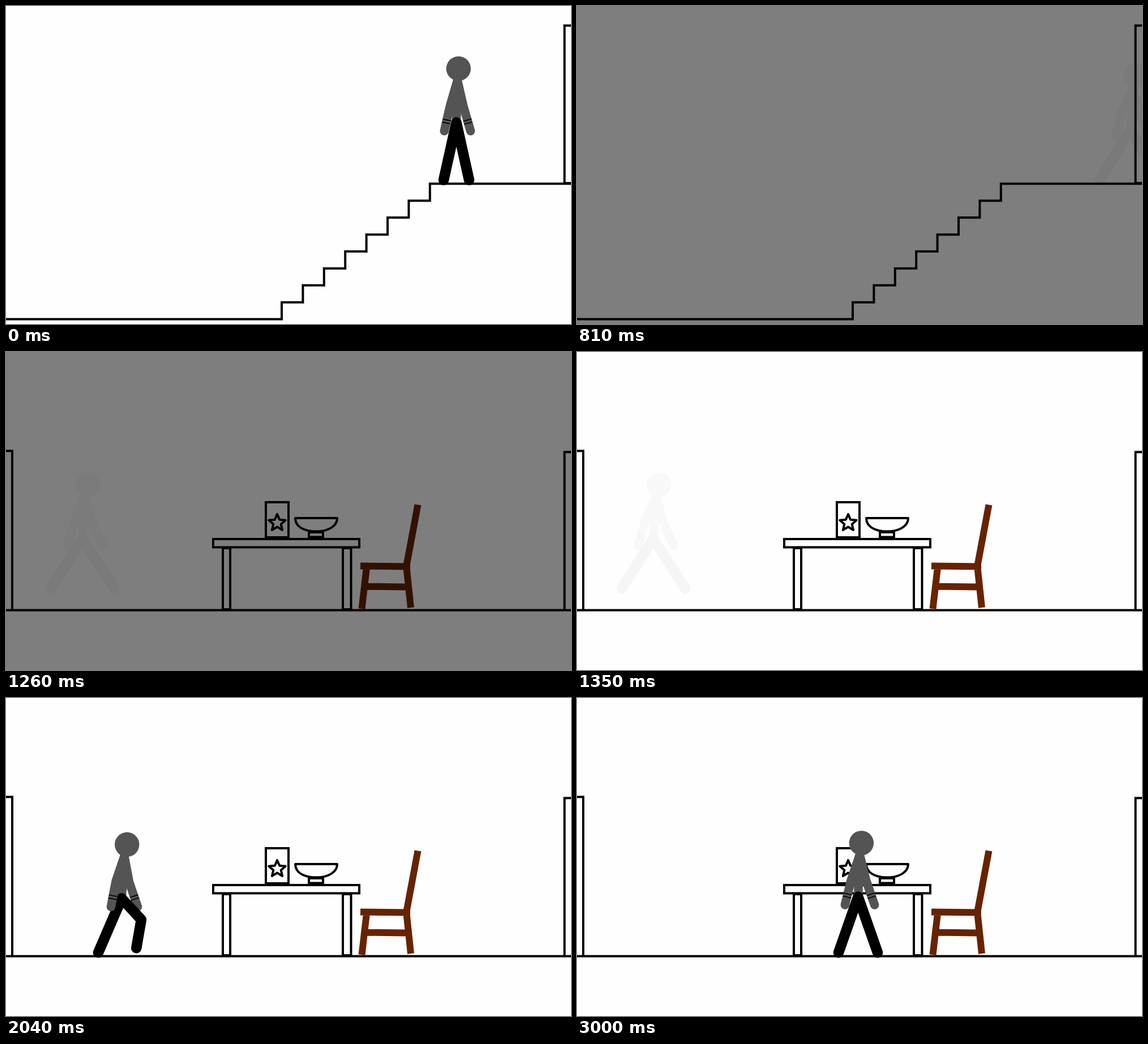
Recreate the animation shown at these times as an HTML page. Size 998 px wide and 561 px high, loop 3600 ms.

```html
<!DOCTYPE html>
<html lang="en">
<head>
<meta charset="utf-8">
<title>Walk home</title>
<style>
html, body { margin: 0; width: 100%; height: 100%; overflow: hidden; background: #fefefe; }
svg { display: block; width: 100%; height: 100%; }
path { fill: none; }
.ink { stroke: #000; stroke-width: 4; }
.solid path { fill: #fefefe; }
.chair { stroke: #672300; stroke-width: 12; }
.skin, .legs { stroke: #545454; stroke-width: 15.5; stroke-linecap: round; stroke-linejoin: round; }
.legs { stroke: #000; stroke-width: 18.5; }
.band { stroke: #000; stroke-width: 1.7; }
</style>
</head>
<body>
<svg viewBox="0 0 998 561">
  <rect width="998" height="561" fill="#fefefe"/>
  <g id="stairs" class="ink">
    <path id="steps"/>
    <path d="M1002 34.5H986.5V312.5H1002"/>
  </g>
  <g id="room">
    <g class="ink solid">
      <path d="M0 455.5H998M-4 174.5H11V455M1002 176.5H986.5V455"/>
      <path d="M383 346H396V454H383ZM595 346H609.5V454H595Z"/>
      <path d="M366 330H624V344.5H366Z"/>
      <path d="M459 265H499V327H459Z"/>
      <path id="star" stroke-linejoin="round"/>
      <path d="M535 318H560V326.5H535Z"/>
      <path stroke-linejoin="round" d="M511 293H585C585 308 568 316.5 548 316.5C526 316.5 511 308 511 293Z"/>
    </g>
    <path class="chair" d="M626 377.5L714 378.5M727.5 269.5L707 379M637 380L628.5 453M707 376L715 451M636 413.5L709 414.5"/>
  </g>
  <g id="man">
    <path id="armB" class="skin"/><path id="bandB" class="band"/>
    <path id="torso" class="skin"/>
    <circle id="head" r="21.7" fill="#545454"/>
    <path id="legs" class="legs"/>
    <path id="armA" class="skin"/><path id="bandA" class="band"/>
  </g>
  <rect id="dark" width="998" height="561"/>
</svg>
<script>
const $ = id => document.getElementById(id);
const set = (id, attrs) => { for (const k in attrs) $(id).setAttribute(k, attrs[k]); };
const clamp = (v, lo = 0, hi = 1) => Math.min(hi, Math.max(lo, v));
const mix = (a, b, p) => a + (b - a) * p;
const line = pts => 'M' + pts.map(p => p.map(v => v.toFixed(2)).join(' ')).join('L');

// Each walk: footprints from left to right, ms per step, time of the last footfall
const outdoors = { prints: [773, 818, 924, 1030], beat: 285, end: 570, floor: 307 };
const indoors = { prints: [-62, 50, 163, 274, 386, 462, 531], beat: 307, end: 3000, floor: 449 };

// Two equal bones with the knee bending forward
function leg([hx, hy], [x, y]) {
  const dx = x - hx, dy = y - hy, d = Math.hypot(dx, dy), ux = dx / d, uy = dy / d;
  const bone = clamp(d / 2, 51, 52.5), reach = Math.min(d, 2 * bone);
  const bow = Math.sqrt(bone * bone - reach * reach / 4);
  return line([[hx, hy],
    [hx + ux * reach / 2 + uy * bow, hy + uy * reach / 2 - ux * bow],
    [hx + ux * reach, hy + uy * reach]]);
}

function arm(side, [x, y], deg, bend) {
  const s = Math.sin(deg * Math.PI / 180), c = Math.cos(deg * Math.PI / 180);
  const hand = [x + 92 * s, y + 92 * c], elbow = [x + 46 * s - bend * c, y + 46 * c + bend * s];
  const dx = hand[0] - elbow[0], dy = hand[1] - elbow[1], d = Math.hypot(dx, dy);
  const ux = dx / d, uy = dy / d;
  const band = r => line([-7.5, 7.5].map(w => [hand[0] - ux * r + uy * w, hand[1] - uy * r - ux * w]));
  set('arm' + side, { d: line([[x, y], elbow, hand]) });
  set('band' + side, { d: band(14.5) + band(20) });
}

// The hips swing over the standing foot while the other foot passes it.
function drawMan({ prints, beat, end, floor }, t) {
  const count = prints.length - 2;
  const phase = clamp(count + (t - end) / beat, 0, count);
  const n = Math.min(Math.floor(phase), count - 1), p = phase - n;
  const [back, stand, next] = prints.slice(n, n + 3);

  const gap = mix(stand - back, next - stand, p), lean = gap * 0.085;
  const x = mix(back + stand, stand + next, p) / 2;
  const hip = [x, floor - Math.sqrt(104 ** 2 - (x - stand) ** 2)];
  const neck = [x + lean / 2, hip[1] - 74];
  const foot = [mix(back, next, p ** 1.6), floor - 20 * Math.sin(Math.PI * p)];
  const swing = (11 + gap * 0.08) * (2 * p - 1) * (n % 2 ? -1 : 1);

  set('head', { cx: x + lean, cy: hip[1] - 95 });
  set('torso', { d: line([neck, hip]) });
  set('legs', { d: leg(hip, [stand, floor]) + leg(hip, foot) });
  arm('A', neck, swing, lean * 0.35);
  arm('B', neck, -swing, lean * 0.35);
}

function draw(t) {
  const inside = t >= 900, waiting = inside && t < 1500;
  set('stairs', { visibility: inside ? 'hidden' : 'visible' });
  set('room', { visibility: inside ? 'visible' : 'hidden' });
  drawMan(inside ? indoors : outdoors, waiting ? 0 : t);
  set('man', {
    transform: waiting ? 'translate(141 -32)' : '',
    opacity: waiting ? 0.03 : inside ? clamp(0.03 + (t - 1470) / 180) : clamp(0.04 + (600 - t) / 180, 0.04)
  });
  set('dark', { opacity: clamp(Math.min(t - 720, 1350 - t) / 180) });
}

let steps = 'M0 552.5';
for (let i = 0; i < 8; i++) steps += `H${487 + 37.4 * i}V${552.5 - 29.875 * (i + 1)}`;
set('steps', { d: steps + 'H998' });

set('star', {
  d: line(Array.from({ length: 10 }, (_, i) => {
    const r = i % 2 ? 7 : 15.5, a = i * Math.PI / 5;
    return [479 + r * Math.sin(a), 301.5 - r * Math.cos(a)];
  })) + 'Z'
});

const start = performance.now();
function tick(now) {
  const t = Math.max(0, now - start) % 3600;
  draw(Math.floor(t / 30) * 30);
  requestAnimationFrame(tick);
}
draw(0);
requestAnimationFrame(tick);
</script>
</body>
</html>
```
